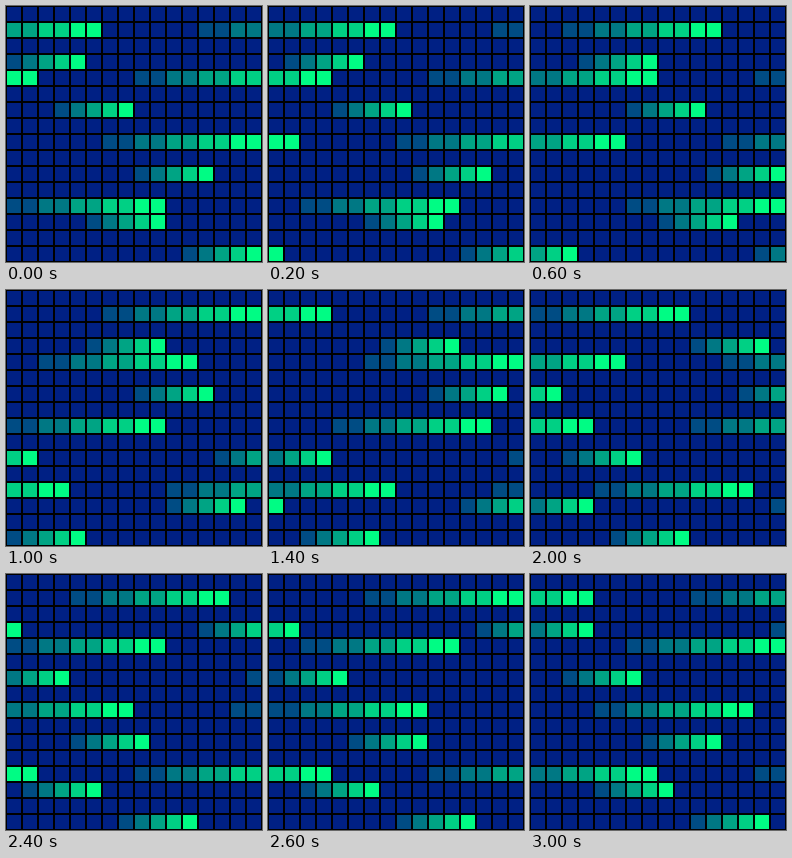
Recreate the animation shown at these times as an HTML page with a canvas. Size 256 by 256 pixels, loop 3.2 s.

```html
<!DOCTYPE html>
<html lang="en">
<head>
<meta charset="utf-8">
<title>Running lights</title>
<style>
  html, body { margin: 0; height: 100%; overflow: hidden; background: #000; }
  canvas { display: block; width: 100vw; height: 100vh; }
</style>
</head>
<body>
<canvas id="stage" width="256" height="256"></canvas>
<script>
const ctx = document.getElementById('stage').getContext('2d');
const SIZE = 16, STEP = 200, LEVELS = 5;

// row: [column of the head at time 0, cells per step]
const runners = {
  1: [5, 2], 3: [4, 1], 4: [1, 2], 6: [7, 1], 8: [15, 2],
  10: [12, 1], 12: [9, 2], 13: [9, 1], 15: [15, 1]
};

// Brightness fades by one level for every `speed` cells behind the head.
function level(row, col, step) {
  if (!runners[row]) return 0;
  const [start, speed] = runners[row];
  const behind = (start + speed * step - col + SIZE * 4) % SIZE;
  return Math.max(0, LEVELS - Math.floor(behind / speed));
}

function draw(now) {
  const step = Math.floor(now / STEP) % SIZE;
  ctx.fillStyle = '#000';
  ctx.fillRect(0, 0, 256, 256);
  for (let row = 0; row < SIZE; row++) {
    for (let col = 0; col < SIZE; col++) {
      const green = Math.round(32 + 44 * level(row, col, step));
      ctx.fillStyle = `rgb(0, ${green}, 132)`;
      ctx.fillRect(col * SIZE + 1, row * SIZE + 1, 14, 14);
    }
  }
}

const begin = performance.now();
function tick() {
  draw(performance.now() - begin);
  requestAnimationFrame(tick);
}
tick();
</script>
</body>
</html>
```
